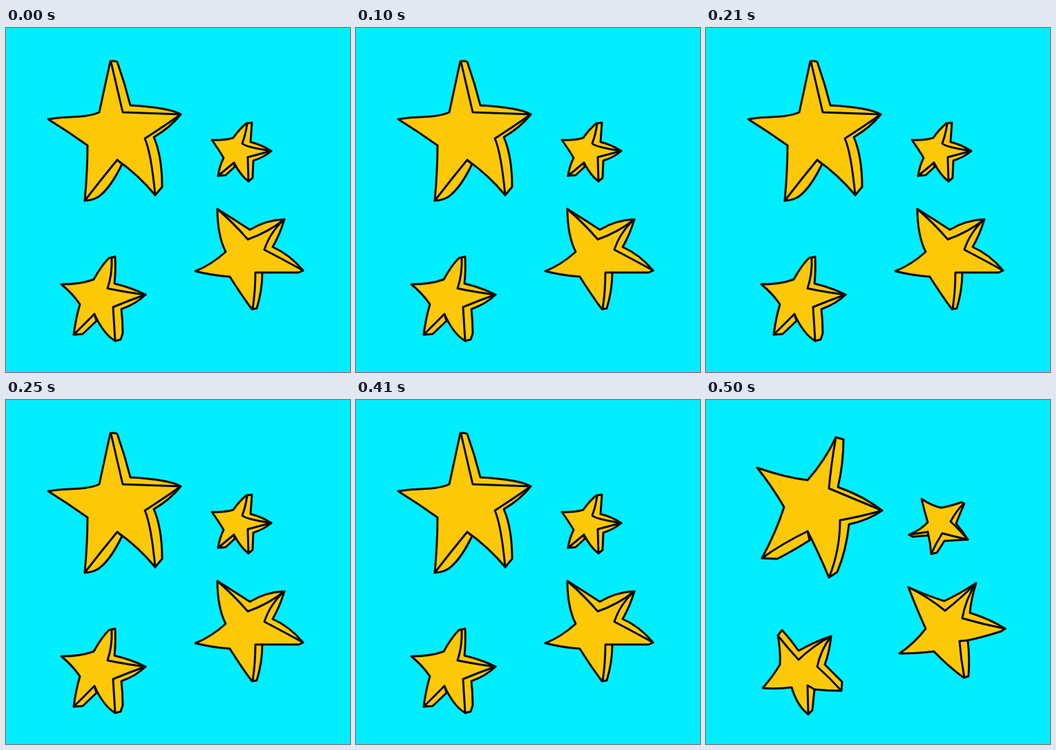
An HTML page that plays this animation: 498 by 498 pixels, repeating every 550 ms.

```html
<!DOCTYPE html>
<html lang="en">
<head>
<meta charset="utf-8">
<title>Stars</title>
<style>
  html, body { margin: 0; width: 100%; height: 100%; overflow: hidden; background: #00eeff; }
  svg { display: block; width: 100%; height: 100%; }
  path { stroke: #080804; stroke-width: 3; stroke-linejoin: round; stroke-linecap: round; }
  .body { fill: #fdc907; }
  .edge { fill: none; }
</style>
</head>
<body>
<svg id="stage" viewBox="0 0 498 498"></svg>
<script>
const LOOP = 550;
const TILT_AT = 500;

// Each star: [silhouette, inner edges of its thick side]
const upright = [
  ["M151 48Q157 47 161 49Q172 80 180 112Q236 115 253 125Q238 144 214 158Q226 186 226 230L216 242Q192 213 161 191L168 197Q153 228 138 241Q130 249 114 250Q118 205 118 170Q90 150 61 132C85 127 115 131 135 122Z",
   "M152 49Q161 88 169 122L253 125Q226 144 201 160Q210 180 216 242M161 191Q137 220 114 250"],
  ["M348 138L356 137L354 165Q370 169 384 178Q374 187 358 192L357 217L351 222Q340 214 330 195L331 201L318 213L307 214Q309 200 315 188Q308 176 298 162Q315 163 329 159Q338 146 348 138Z",
   "M349 139Q347 154 342 167Q345 172 384 178Q365 183 350 187L351 222M330 195L307 214"],
  ["M306 262Q330 277 353 292Q376 278 403 277Q396 300 386 317Q411 328 430 351L424 354L371 354Q371 380 363 406L356 407Q341 387 324 360Q297 358 274 352Q297 343 318 324Q306 300 306 262Z",
   "M306 262Q330 283 350 306Q379 296 403 277Q382 296 374 321Q399 334 430 351M371 354L361 354Q361 381 357 407"],
  ["M149 333L158 331Q159 352 157 370Q182 376 202 386Q189 399 167 407Q169 424 169 442L166 451L158 453Q141 443 128 414L131 424L111 443L98 444Q101 420 107 400Q96 384 80 371Q108 371 127 364Q138 344 149 333Z",
   "M153 333Q154 356 147 377Q176 383 202 386Q179 394 155 404L158 453M128 414L98 444"]
];

const tilted = [
  ["M188 54L199 57Q199 92 191 126Q228 139 255 160Q235 174 207 180Q203 218 190 249L178 257Q163 221 147 190L150 203Q125 219 103 230L81 229Q102 190 113 155Q95 124 74 98Q114 112 147 116Q172 88 188 54Z",
   "M188 54Q181 94 178 128L255 160Q223 169 194 174Q194 218 178 257M147 190Q110 208 81 229"],
  ["M312 143Q326 153 341 156Q356 153 370 148L374 150Q367 166 362 179Q371 189 379 202L345 204Q338 216 334 221L326 223Q325 207 321 191L322 196L299 198L294 195Q311 188 321 177Q316 160 312 143Z",
   "M373 150Q362 161 354 176Q366 187 379 202Q361 198 342 193Q333 207 326 223M321 191L294 195"],
  ["M293 271Q322 284 345 291Q370 279 391 265Q384 287 382 308Q411 317 433 331L427 335Q402 343 379 348Q382 374 380 400L373 402Q350 385 330 364Q306 367 280 367Q302 352 318 331Q304 300 293 271Z",
   "M293 271Q323 286 346 305Q369 287 391 265Q376 288 371 316Q402 325 433 331M379 348L367 349Q369 375 374 402"],
  ["M110 333Q123 347 134 363Q159 349 181 342Q179 364 172 383L197 408L196 421Q177 421 157 419L154 449L148 455Q132 443 124 416Q102 419 82 417Q97 400 107 383Q108 361 104 341Z",
   "M104 341Q119 360 134 376Q156 355 181 342Q166 362 161 386Q179 402 196 421M157 419L147 413L148 455"]
];

const drawStar = ([body, edge]) =>
  `<path class="body" d="${body}"/><path class="edge" d="${edge}"/>`;

const stage = document.getElementById("stage");
stage.innerHTML = [upright, tilted]
  .map(stars => `<g>${stars.map(drawStar).join("")}</g>`).join("");
const [uprightGroup, tiltedGroup] = stage.children;

function render(time) {
  const isTilted = time % LOOP >= TILT_AT;
  uprightGroup.style.display = isTilted ? "none" : "";
  tiltedGroup.style.display = isTilted ? "" : "none";
}

const start = performance.now();
function tick() {
  render(performance.now() - start);
  requestAnimationFrame(tick);
}
tick();
</script>
</body>
</html>
```
